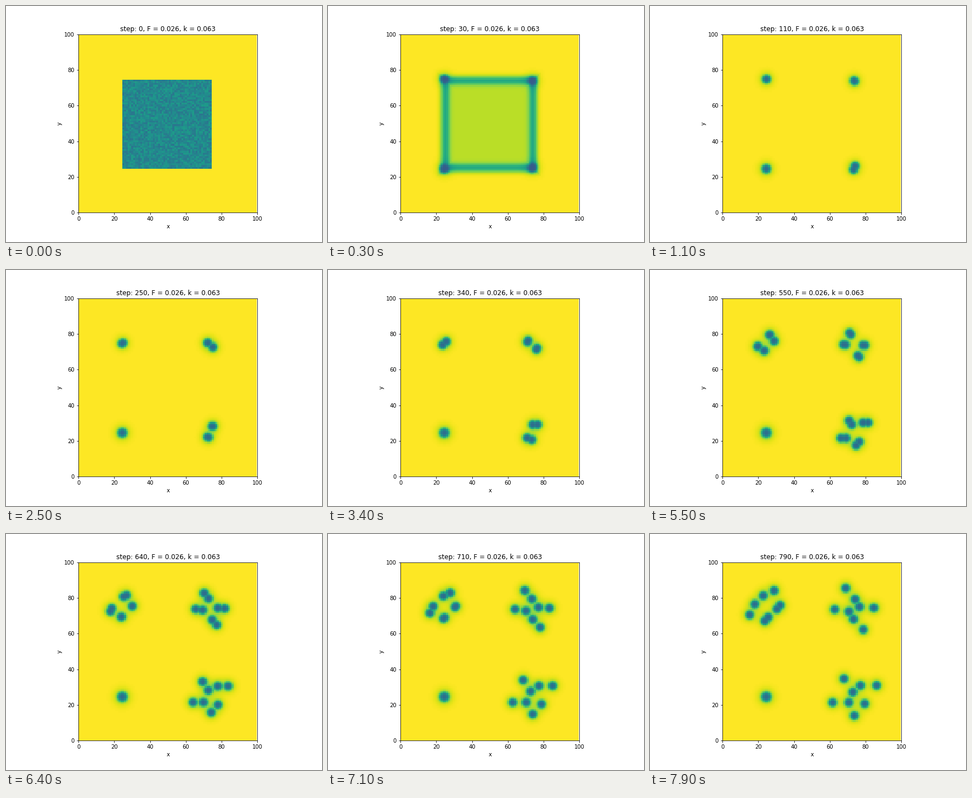
A matplotlib script for the animation above (8000 ms loop, 576x432 px).

```python
import numpy as np
import matplotlib.pyplot as plt
from matplotlib.animation import FuncAnimation

N = 100
FRAMES = 80
F, K = 0.026, 0.063

# Colonies: root, first split, time between splits, lag of second daughters,
# and the split angles of each generation.
COLONIES = [
    dict(root=(24.6, 74.7), start=30, period=16.5, lag=12,
         angles=[[45], [-34, -55], [65, 50, 25, 52]]),
    dict(root=(73.6, 73.7), start=18, period=19.5, lag=0,
         angles=[[-40], [63, 64], [-8, -50, -47, -4]]),
    dict(root=(73.6, 25.1), start=9, period=21, lag=0,
         angles=[[68], [-21, 0], [0, 49, -57, 0]]),
]
LONER = (24.5, 24.5)


def half_gap(age):
    """Half the distance between two daughters: slow start, fast, then easing."""
    s = 4 * np.log1p(np.exp(age / 4))
    return 8.5 * s / (s + 25)


def colony(t, root, start, period, lag, angles):
    pts = [np.array(root)]
    for gen, turn in enumerate(angles):
        nxt = []
        for i, (p, a) in enumerate(zip(pts, np.radians(turn))):
            late = lag * (i % 2) if gen == 2 else 0
            d = half_gap(t - start - gen * period - late)
            step = d * np.array([np.cos(a), np.sin(a)])
            nxt += [p - step, p + step]
        pts = nxt
    return pts


gx, gy = np.meshgrid(np.arange(N), np.arange(N))
edge = np.maximum(abs(gx - 49.5), abs(gy - 49.5))
noise = np.random.default_rng(3).uniform(0.45, 0.61, (N, N))


def field(t):
    if t == 0:
        return np.where(edge < 25, 1 - noise, 1.0)
    pts = [p for c in COLONIES for p in colony(t, **c)] + [LONER]
    x, y = np.array(pts).T[:, :, None, None]
    # Daughters that still overlap share one halo.
    gap2 = (x - x.ravel()) ** 2 + (y - y.ravel()) ** 2
    share = 1 / np.exp(-gap2 / 9).sum(axis=-1, keepdims=True)
    size = np.ones_like(x)
    size[-1] = np.interp(t, [11, 42], [1.06, 1.18])
    r = np.hypot(gx - x, gy - y) / size
    core = 0.56 * np.exp(-(r / 2.3) ** 3).max(axis=0)
    halo = 0.16 * (share * np.exp(-(r / 3.8) ** 2)).sum(axis=0)
    total = core + halo
    if t < 11:
        # The starting block empties first, then its rim fades.
        body = 0.7 * np.exp(-0.95 * (t - 1))
        rim = 0.5 * np.exp(-((t - 1) / 3.2) ** 2)
        total += body / (1 + np.exp((edge - 25) / (0.8 + 0.2 * t)))
        total += rim * np.exp(-((edge - 24.5) / 2.4) ** 2)
    return 1 - total / (1 + (total / 0.72) ** 6) ** (1 / 6)


fig, ax = plt.subplots(figsize=(8, 6), dpi=72)
fig.subplots_adjust(left=0.125, right=0.9, bottom=0.125, top=0.88)
img = ax.imshow(field(0), cmap="viridis", vmin=0, vmax=1,
                origin="lower", interpolation="nearest")
ticks = range(0, N + 1, 20)
ax.set(xlim=(0, N), ylim=(0, N), xticks=ticks, yticks=ticks,
       xlabel="x", ylabel="y")
title = ax.set_title("")


def update(i):
    img.set_data(field(i))
    title.set_text(f"step: {10 * i}, F = {F}, k = {K}")
    return img, title


anim = FuncAnimation(fig, update, frames=FRAMES, interval=100, repeat=True)
plt.show()
```
